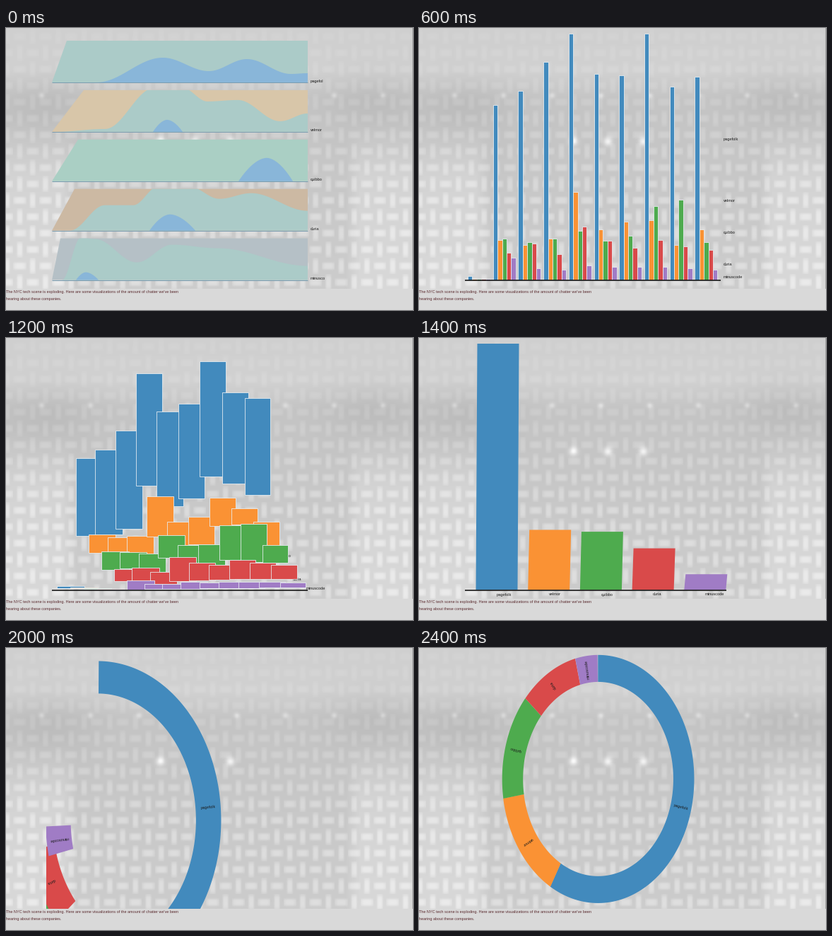
These frames come from a looping animation (576 px wide and 399 px high, 2.6 s). A matplotlib script:

```python
import numpy as np
import matplotlib.pyplot as plt
from matplotlib.animation import FuncAnimation
from matplotlib.patches import Polygon, Rectangle

W, H, DPI = 576, 399, 100
FRAMES, INTERVAL = 13, 200
LEFT, RIGHT, BASE = 65, 427, 356.5
PLOT_W, PLOT_H = 378, 351          # extent of the ring transition
SQUEEZE = 272 / PLOT_H             # the charts are narrowed horizontally
BAND, BAND_STEP, COL_W, COL_STEP = 59, 73.7, 32, 35.7
NAMES = ["pagefolk", "velmor", "quibbo", "duria", "minuscode"]
COLORS = ["#428abd", "#fa9234", "#4eab4e", "#d94a4a", "#a07cc5"]
LABEL_Y = np.array([157, 245, 290, 334, 352])
TEAL, BLUE = "#abcbc8", "#89b6d9"

# One row per company, one column per period, in stacked pixels.
VALUES = np.array([
    [3, 135, 146, 168, 190, 159, 158, 190, 149, 157],
    [1, 31, 27, 32, 68, 39, 45, 46, 27, 39],
    [1, 32, 29, 32, 38, 30, 34, 57, 62, 29],
    [1, 21, 28, 20, 41, 30, 25, 31, 26, 23],
    [1, 17, 9, 8, 11, 10, 10, 10, 9, 8],
])
TOTALS = VALUES.sum(axis=1)
BELOW = VALUES[::-1].cumsum(axis=0)[::-1] - VALUES
BEFORE = VALUES.cumsum(axis=1) - VALUES
BAR_SCALE = 348.5 / TOTALS[0]

# Row tint, x of the top-left corner, middle layer, (start, peak, end, height).
HORIZONS = [
    (TEAL, 86, None, None),
    ("#d8c6a9", 110, [(70, 0), (140, 4), (210, 62), (250, 62), (285, 43),
                      (328, 45), (388, 15), (427, 26)], (208, 228, 250, 17)),
    ("#aacfc4", 102, None, (329, 369, 406, 33)),
    ("#ccb9a3", 97, [(90, 0), (140, 36), (180, 36), (215, 62), (260, 62),
                     (302, 45), (347, 53), (427, 28)], (203, 232, 268, 23)),
    ("#b5c0c6", 77, [(79, 0), (106, 60), (126, 58), (185, 25), (235, 50),
                     (300, 45), (427, 20)], (99, 113, 131, 11)),
]
CHATTER = [(128, 0), (222, 35), (287, 16), (341, 33), (403, 12), (427, 13)]

fig = plt.figure(figsize=(W / DPI, H / DPI), dpi=DPI)
ax = fig.add_axes([0, 0, 1, 1])
ax.axis("off")
window = Rectangle((57, 0), 400, 369, transform=ax.transData)
artists = []


def px(size):
    return size * 72 / DPI


def ease(t):
    return 4 * t ** 3 if t < 0.5 else 1 - 4 * (1 - t) ** 3


def curve(points, x):
    """Cosine-smoothed curve through a few points."""
    xs, ys = np.array(points, float).T
    k = np.clip(np.searchsorted(xs, x) - 1, 0, len(xs) - 2)
    t = np.clip((x - xs[k]) / (xs[k + 1] - xs[k]), 0, 1)
    return ys[k] + (ys[k + 1] - ys[k]) * (1 - np.cos(np.pi * t)) / 2


def background():
    y, x = np.mgrid[0:H, 0:W].astype(float)

    def glow(cx, cy, sx, sy):
        return np.exp(-((x - cx) / sx) ** 2 - ((y - cy) / sy) ** 2)

    tone = np.interp(y, [0, 60, 100, 160, 260, 369], [208, 211, 199, 201, 207, 210])
    tone -= 8 * (glow(60, 110, 70, 45) + glow(520, 100, 70, 45))
    tone += 12 * np.clip((np.abs(x - 290) - 190) / 20, 0, 1) * np.clip((y - 130) / 80, 0, 1)
    col, row = np.round((x - 110) / 18.2), np.round((y - 313) / 23.2)
    dx, dy = x - 110 - 18.2 * col, y - 313 - 23.2 * row
    flat = (col + row) % 2 == 0
    strip = np.where(flat, np.exp(-(dx / 9) ** 4 - (dy / 5) ** 4),
                     np.exp(-(dx / 4) ** 4 - (dy / 11) ** 4))
    tone += (strip - 0.3) * np.interp(y, [0, 70, 130, 250], [3, 6, 10, 19])
    for cx in (218, 267, 317):
        tone += 45 * glow(cx, 160, 6, 6)
    for cx in range(50, 540, 69):
        tone += 22 * glow(cx, 95, 4, 4)
    tone[:, -1] = 165
    tone[369:] = 217
    return np.repeat(np.clip(tone, 0, 255).astype(np.uint8)[..., None], 3, axis=2)


def keep(artist):
    artist.set_clip_path(window)
    artists.append(artist)


def shape(points, color, edge="none", width=0.0):
    keep(ax.add_patch(Polygon(points, facecolor=color, edgecolor=edge,
                              linewidth=px(width), zorder=len(artists) + 2)))


def box(x, y, w, h, color):
    shape([(x, y), (x + w, y), (x + w, y + h), (x, y + h)], color, "#e8eef2", 0.8)


def label(x, y, text, **kw):
    style = dict(ha="left", va="center", family="Liberation Sans",
                 size=px(5.6), color="#1c1c1c", zorder=len(artists) + 2)
    keep(ax.text(x, y, text, **{**style, **kw}))


def rule(x1, y, color="#111111", width=1.6):
    artists.extend(ax.plot([LEFT, x1], [y, y], color=color, lw=px(width),
                           solid_capstyle="butt", zorder=len(artists) + 2))


def area(x, low, high, color):
    shape(np.r_[np.c_[x, high], np.c_[x, low][::-1]], color)


def horizons():
    x = np.linspace(LEFT, RIGHT, 363)
    for i, (tint, corner, layer, hump) in enumerate(HORIZONS):
        base = 77 + 69.9 * i
        roof = np.clip((x - LEFT) / (corner - LEFT), 0, 1) * 59
        area(x, base + 0 * x, base - roof, tint)
        if layer:
            area(x, base + 0 * x, base - np.minimum(curve(layer, x), roof), TEAL)
        if hump:
            a, peak, b, height = hump
            xs = np.linspace(a, b, 60)
            u = np.where(xs < peak, (peak - xs) / (peak - a), (xs - peak) / (b - peak))
            area(xs, base + 0 * xs, base - height * (1 - u ** 1.8), BLUE)
        else:
            area(x, base + 0 * x, base - curve(CHATTER, x), BLUE)
        rule(RIGHT, base, "#7c9db0", 1)
        label(431, base - 2, NAMES[i][:7])


def stacked_areas():
    x = np.linspace(LEFT, RIGHT, 300)
    knots = np.linspace(LEFT, RIGHT, VALUES.shape[1])
    for k, name in enumerate(NAMES):
        low = curve(np.c_[knots, BELOW[k]], x)
        high = curve(np.c_[knots, BELOW[k] + VALUES[k]], x)
        area(x, BASE - low, BASE - high, COLORS[k])
        label(431, LABEL_Y[k], name)
    rule(RIGHT, BASE)


def grouped_bars():
    w = COL_W / len(NAMES)
    for k, name in enumerate(NAMES):
        label(431, LABEL_Y[k], name)
        for i, value in enumerate(VALUES[k] * 348.5 / VALUES.max()):
            box(69 + COL_STEP * i + w * k, BASE - value, w, value, COLORS[k])
    rule(RIGHT, BASE)


def stacked_bars(progress=0.0):
    """Period columns that slide over into one bar per company."""
    for k, name in enumerate(NAMES):
        end_x = 80.5 + BAND_STEP * k
        e = ease(progress)
        label(431 + (end_x + BAND / 2 - 431) * e,
              LABEL_Y[k] + (363 - LABEL_Y[k]) * e, name)
        for i, value in enumerate(VALUES[k]):
            e = ease(max(0, progress - 0.0057 * i))
            x = 69 + COL_STEP * i
            bottom = BELOW[k, i] + (BEFORE[k, i] * BAR_SCALE - BELOW[k, i]) * e
            height = value * (1 + (BAR_SCALE - 1) * e)
            box(x + (end_x - x) * e, BASE - bottom - height,
                COL_W + (BAND - COL_W) * e, height, COLORS[k])
    rule(RIGHT, BASE)


def total_bars():
    lean = 2
    for k, name in enumerate(NAMES):
        x, top = 80.5 + BAND_STEP * k, BASE - TOTALS[k] * BAR_SCALE
        label(x + BAND / 2, 363, name)
        shape([(x, BASE), (x + lean, top), (x + BAND + lean, top), (x + BAND, BASE)],
              COLORS[k])
    rule(435, BASE)


def ring(t):
    """Bars bend into arcs of a shrinking circle until they close a ring."""
    a = np.cos(t * np.pi / 2)
    r = PLOT_H / 2 / min(1, t + 1e-3)
    inner = r - BAND / SQUEEZE / (2 - a)
    cy = a * 357 + (1 - a) * 185
    stops = np.r_[0, TOTALS.cumsum()] / TOTALS.sum() * 2 * np.pi
    for k, name in enumerate(NAMES):
        right = 15.5 + BAND_STEP * k + BAND
        cx = LEFT - r * SQUEEZE + a * right + (1 - a) * (PLOT_W + 272) / 2
        start = a * (np.pi / 2 - TOTALS[k] * BAR_SCALE / r) + (1 - a) * stops[k]
        end = a * np.pi / 2 + (1 - a) * stops[k + 1]

        def at(radius, angle):
            return np.c_[cx + SQUEEZE * radius * np.sin(angle),
                         cy - radius * np.cos(angle)]

        angles = np.linspace(start, end, 120)
        shape(np.r_[at(r, angles), at(inner, angles[::-1])], COLORS[k])
        mid = (start + end) / 2
        x, y = at((r + inner) / 2, mid)[0]
        label(x, y, name, ha="center", rotation=90 - np.degrees(mid),
              rotation_mode="anchor")


def draw(i):
    while artists:
        artists.pop().remove()
    if i == 0:
        horizons()
    elif i == 2:
        stacked_areas()
    elif i == 3:
        grouped_bars()
    elif i in (4, 5):
        stacked_bars()
    elif i == 6:
        stacked_bars(0.4)
    elif i == 7:
        total_bars()
    elif i > 7:
        ring(ease(min(0.93, 0.6186 + 0.2045 * (i - 10))))
    return artists


ax.imshow(background(), extent=(0, W, H, 0), aspect="auto", interpolation="nearest")
ax.set(xlim=(0, W), ylim=(H, 0))
CAPTION = ["The NYC tech scene is exploding. Here are some visualizations of "
           "the amount of chatter we've been", "hearing about these companies."]
for n, line in enumerate(CAPTION):
    ax.text(-0.5, 374 + 10 * n, line, family="Liberation Sans", size=px(5.5),
            color="#5a2a2e", va="center")

anim = FuncAnimation(fig, draw, frames=FRAMES, interval=INTERVAL,
                     init_func=lambda: draw(0), repeat=True, repeat_delay=0)
plt.show()
```
